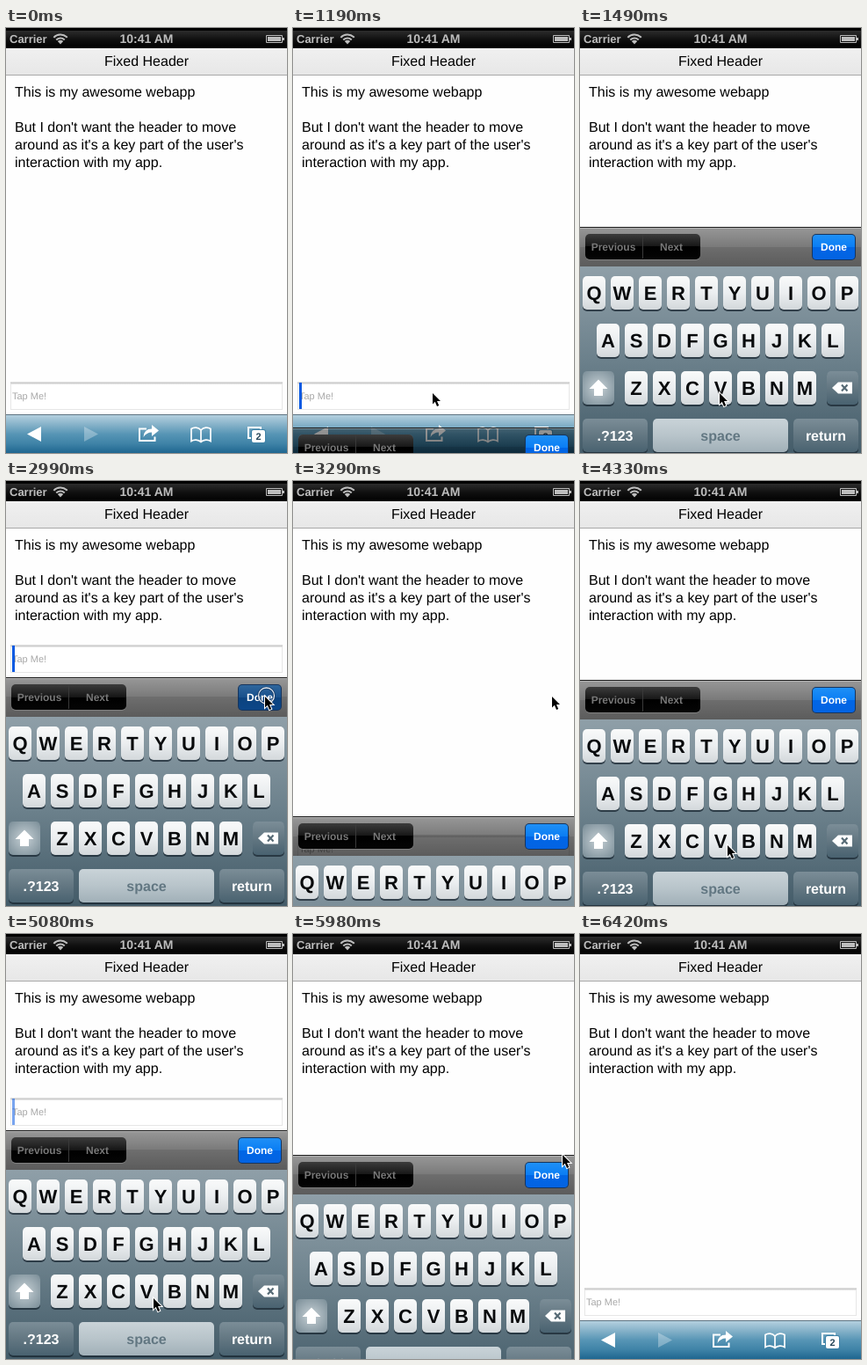
Write an HTML page with a canvas that moves like this. It is 320 px wide and 483 px high and loops after 7.73 s.

```html
<!DOCTYPE html>
<html lang="en">
<head>
<meta charset="utf-8">
<title>Fixed header demo</title>
<style>
html, body { margin: 0; width: 100%; height: 100%; overflow: hidden; background: #fff; }
canvas { display: block; }
</style>
</head>
<body>
<canvas id="stage" width="320" height="483"></canvas>
<script>
const ctx = document.getElementById('stage').getContext('2d');
const LOOP = 7730, TICK = 149.3;
const KEYBOARD_HEIGHT = 260;

// Pointer track: [tick, x, y]
const TRACK = [
  [4, 161, 443], [5, 159, 415], [15, 159, 415], [20, 295, 245], [22, 295, 245], [26, 168, 414],
  [34, 168, 414], [38, 296, 245], [39, 296, 245], [40, 307, 251], [41, 330, 256]
];

const clamp = v => Math.min(1, Math.max(0, v));
const between = (v, lo, hi) => v >= lo && v <= hi;
const swing = t => (1 - Math.cos(Math.PI * clamp(t))) / 2;
const slide = (tick, start) => swing((tick - start) / 2.8);

function shade(y, h, ...colors) {
  const g = ctx.createLinearGradient(0, y, 0, y + h);
  colors.forEach((c, i) => g.addColorStop(i / (colors.length - 1), c));
  return g;
}

// Gradient with a hard break at mid height
function gloss(y, h, a, b, c, d) {
  const g = ctx.createLinearGradient(0, y, 0, y + h);
  [[0, a], [.5, b], [.5, c], [1, d]].forEach(stop => g.addColorStop(...stop));
  return g;
}

function glow(x, y, r, inner, outer) {
  const g = ctx.createRadialGradient(x, y, 0, x, y, r);
  g.addColorStop(0, inner);
  g.addColorStop(1, outer);
  return g;
}

function rect(x, y, w, h, fill) {
  ctx.fillStyle = fill;
  ctx.fillRect(x, y, w, h);
}

function round(x, y, w, h, r, fill) {
  ctx.beginPath();
  ctx.roundRect(x, y, w, h, r);
  ctx.fillStyle = fill;
  ctx.fill();
}

function text(str, x, y, size, color, weight = 'normal', align = 'left') {
  ctx.font = `${weight} ${size}px "Liberation Sans", Arial, sans-serif`;
  ctx.textRendering = 'geometricPrecision';
  ctx.textAlign = align;
  ctx.fillStyle = color;
  ctx.fillText(str, x, y);
}

const label = (str, x, y, size, color) => text(str, x, y, size, color, 'bold', 'center');

function fillPath(d, color) {
  ctx.fillStyle = color;
  ctx.fill(new Path2D(d));
}

function strokePath(d, color, width) {
  ctx.strokeStyle = color;
  ctx.lineWidth = width;
  ctx.stroke(new Path2D(d));
}

function ring(x, y, r, color, width, from = 0, to = Math.PI * 2) {
  ctx.beginPath();
  ctx.arc(x, y, r, from, to);
  ctx.strokeStyle = color;
  ctx.lineWidth = width;
  ctx.stroke();
}

function statusBar() {
  const ink = '#bdbdbd';
  rect(0, 0, 320, 23, '#000');
  rect(0, 3, 320, 20, shade(3, 20, '#2c2c2c', '#101010', '#000'));
  text('Carrier', 4, 17, 13, ink, 'bold');
  label('10:41 AM', 160, 17, 14, ink);
  for (const r of [10.5, 6.5]) ring(62, 18, r, ink, 2, -Math.PI * .76, -Math.PI * .24);
  fillPath('M62 18.5L58.8 15Q62 12.6 65.2 15Z', ink);
  strokePath('M296.5 8.5H314.5V16.5H296.5Z', ink, 1);
  rect(298, 10, 15, 5, ink);
  rect(315, 11, 2, 3, ink);
}

function page() {
  rect(0, 23, 320, 460, '#fefefe');
  rect(0, 23, 320, 30, shade(23, 30, '#f0f0f0', '#e7e7e7'));
  rect(0, 53, 320, 1, '#a8a8a8');
  text('Fixed Header', 160, 43, 16, '#000', 'normal', 'center');
  [
    ['This is my awesome webapp', 78],
    ["But I don't want the header to move", 118],
    ["around as it's a key part of the user's", 138],
    ['interaction with my app.', 158]
  ].forEach(([line, y]) => text(line, 10, y, 16, '#000'));
}

function inputField(y, caret) {
  rect(5, y, 310, 31, '#e6e6e6');
  rect(6, y, 308, 30, '#fff');
  rect(5, y - 1, 310, 3, shade(y - 1, 3, '#e4e4e4', '#cfcfcf', '#ececec'));
  text('Tap Me!', 7, y + 19, 11, '#a9a9a9');
  rect(7, y, 3, 30, `rgba(10,90,226,${caret})`);
}

function browserBar() {
  rect(0, 439, 320, 1, '#5d7381');
  rect(0, 440, 320, 43, shade(440, 43, '#b4d0df', '#86b2c9', '#5795b5', '#3f83a7', '#1f6690'));
  fillPath('M24 461.5L40 453V470Z', '#fff');
  fillPath('M105 461.5L89 453V470Z', 'rgba(255,255,255,.3)');
  strokePath('M160 455.5H152V469H169.5V464.5', '#fff', 2);
  fillPath('M156.5 465Q157 455.5 166 455.5V451L174 457.5L166 464V459.5Q160 459.5 156.5 465Z', '#fff');
  strokePath('M222 457C219 453.5 214 453.5 211 455.5V469.5C214 467.5 219 467.5 222 470.5' +
    'C225 467.5 230 467.5 233 469.5V455.5C230 453.5 225 453.5 222 457V470', '#fff', 1.7);
  strokePath('M279 466H276V454H290V457', '#fff', 2);
  round(279, 456, 17, 16, 3, '#3d80a5');
  round(280, 457, 15, 14, 2, '#fff');
  label('2', 287.5, 468, 11, '#27475a');
}

function key(x, y, w, fill) {
  round(x, y + 1, w, 39, 5, 'rgba(25,38,48,.75)');
  round(x, y, w, 38, 5, fill);
}

function accessoryBar(pressed) {
  rect(0, 0, 320, 45, gloss(0, 45, 'rgba(0,0,0,.4)', 'rgba(0,0,0,.52)', 'rgba(0,0,0,.57)', 'rgba(0,0,0,.64)'));
  rect(0, 0, 320, 1, '#1c1c1c');
  rect(0, 1, 320, 1, 'rgba(255,255,255,.25)');
  round(6, 8, 131, 30, 5, 'rgba(255,255,255,.2)');
  round(6, 8, 131, 29, 5, gloss(8, 29, '#3c3c3c', '#161616', '#000', '#050505'));
  rect(71, 9, 1, 27, '#3a3a3a');
  label('Previous', 38, 27, 12, '#787878');
  label('Next', 104, 27, 12, '#787878');
  round(264, 8, 50, 30, 5, '#16345c');
  round(265, 9, 48, 28, 4, pressed
    ? gloss(9, 28, '#2f669c', '#18508c', '#0c437f', '#0c4688')
    : gloss(9, 28, '#1f90f6', '#0a7df4', '#0066e6', '#0463e2'));
  label('Done', 289, 27, 12, '#fff');
}

function keyboard(top, pressed) {
  const light = y => shade(y, 38, '#f9fafa', '#ebeef0', '#d3d8db');
  const dark = y => shade(y, 38, '#7b8d97', '#637782', '#496270');
  ctx.save();
  ctx.translate(0, top);
  accessoryBar(pressed);
  rect(0, 45, 320, 215, shade(45, 215, '#8f9fa8', '#6b808b', '#435b68'));
  ['QWERTYUIOP', 'ASDFGHJKL', 'ZXCVBNM'].forEach((letters, row) => {
    const y = 56 + 54 * row, left = [16, 32, 64][row];
    [...letters].forEach((letter, i) => {
      const center = left + 32 * i;
      key(center - 13, y, 26, light(y));
      label(letter, center, y + 27, 22, '#080a0c');
    });
  });
  key(3, 164, 36, glow(21, 183, 25, '#c6d0d5', '#7c8f99'));
  fillPath('M21 173.5L31.500 184H26V192H16V184H10.500Z', '#fff');
  key(281, 164, 36, dark(164));
  fillPath('M287 183L294 176.500H310V189.500H294Z', '#fff');
  strokePath('M298 179.500L304.500 186.500M304.500 179.500L298 186.500', '#566a75', 2.2);
  key(3, 218, 74, dark(218));
  label('.?123', 40, 242.5, 16, '#fff');
  key(83, 218, 154, shade(218, 38, '#c9d3d8', '#b8c4ca', '#a1b0b8'));
  label('space', 160, 242.5, 16, '#627782');
  key(243, 218, 74, dark(218));
  label('return', 280, 242.5, 16, '#fff');
  ctx.restore();
}

function pointer(tick, pressed) {
  if (!between(tick, 4, 40)) return;
  const next = TRACK.findIndex(p => p[0] > tick);
  const [t0, x0, y0] = TRACK[next - 1], [t1, x1, y1] = TRACK[next];
  const k = swing((tick - t0) / (t1 - t0));
  ctx.save();
  ctx.translate(Math.round(x0 + (x1 - x0) * k), Math.round(y0 + (y1 - y0) * k));
  if (pressed) {
    ring(1.5, -1, 9, 'rgba(20,45,80,.6)', 3);
    ring(1.5, -1, 9, '#e4ebf3', 1.3);
  }
  const arrow = 'M0 0V12.500L2.800 9.800L5 15L7.200 14L5 9H9Z';
  strokePath(arrow, '#fff', 2);
  fillPath(arrow, '#000');
  ctx.restore();
}

function caretAlpha(tick) {
  if (!between(tick, 8, 20) && !between(tick, 27, 39)) return 0;
  if ([16, 19, 34, 37].includes(tick)) return .55;
  return [17, 18, 35, 36].includes(tick) ? 0 : 1;
}

function draw(now) {
  const tick = Math.floor((now % LOOP + 6) / TICK);
  const lift = slide(tick, 7.4) - slide(tick, 20.4) + slide(tick, 26.4) - slide(tick, 39.4);
  const scrolled = between(tick, 11, 20) || between(tick, 30, 39);
  const pressed = tick === 20 || tick === 38;
  page();
  statusBar();
  inputField(scrolled ? 187 : 403, caretAlpha(tick));
  browserBar();
  if (lift > .001) keyboard(Math.floor(483 - KEYBOARD_HEIGHT * lift), pressed);
  pointer(tick, pressed);
}

let start;
function frame(now) {
  start ??= now;
  draw(now - start);
  requestAnimationFrame(frame);
}
draw(0);
requestAnimationFrame(frame);
</script>
</body>
</html>
```
